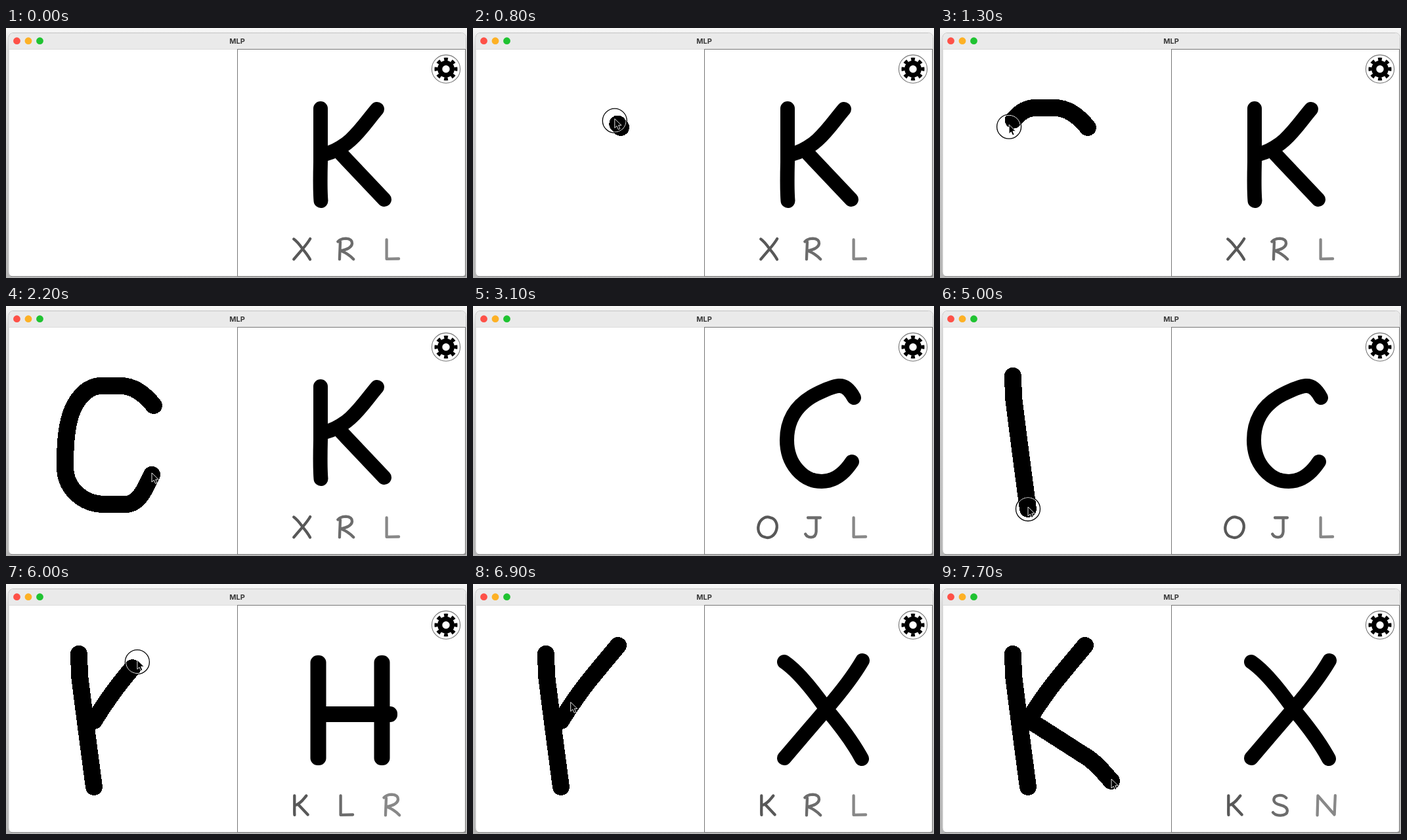
Write an HTML page that moves like this. It is 702 px wide and 382 px high and loops after 8000 ms.

```html
<!DOCTYPE html>
<html lang="en">
<head>
<meta charset="utf-8">
<title>MLP</title>
<style>
  html, body { margin: 0; width: 100%; height: 100%; overflow: hidden; }
  svg { display: block; width: 702px; height: 382px; }
  .title { font: 700 11px Inter, "Liberation Sans", sans-serif; fill: #3a3a3a; text-anchor: middle; }
  .round { fill: none; stroke-linecap: round; stroke-linejoin: round; }
  #ink { stroke-width: 26; shape-rendering: crispEdges; }
  #guess { stroke: #000; stroke-width: 22; }
</style>
</head>
<body>
<svg viewBox="0 0 702 382">
  <defs>
    <linearGradient id="desk" x2="0" y2="1">
      <stop offset="0" stop-color="#f8f8f8"/>
      <stop offset=".08" stop-color="#dedede"/>
      <stop offset="1" stop-color="#b4b4b4"/>
    </linearGradient>
  </defs>
  <rect width="702" height="382" fill="url(#desk)"/>
  <rect x="4" y="7.5" width="696.5" height="372.5" rx="7" fill="#fff" stroke="#c4c4c4"/>
  <path d="M4.5 32V15a7 7 0 0 1 7-7H693a7 7 0 0 1 7 7V32Z" fill="#eaeaea"/>
  <path d="M4.5 32.5H352" stroke="#dcdcdc"/>
  <circle cx="16.5" cy="19.7" r="5.4" fill="#fe5148"/>
  <circle cx="34" cy="19.7" r="5.4" fill="#fdb125"/>
  <circle cx="51.5" cy="19.7" r="5.4" fill="#1fc331"/>
  <text class="title" x="352" y="23.6">MLP</text>
  <path d="M7 379.5H353" stroke="#8c8c8c"/>
  <rect x="352.5" y="32.5" width="347" height="347" fill="none" stroke="#777"/>

  <g fill="none" stroke="#000" transform="translate(670 62.7)">
    <circle r="21.6" stroke="#777" stroke-width="1.1"/>
    <circle r="9.3" stroke-width="7.2"/>
    <circle r="15" stroke-width="5" pathLength="16" stroke-dasharray="1 1" stroke-dashoffset=".5"/>
  </g>

  <g id="guess" class="round"></g>
  <g id="ink" class="round"></g>
  <g id="pointer">
    <g id="brush" fill="none">
      <circle r="17.4" stroke="#fff"/>
      <circle r="18.5" stroke="#000" stroke-width="1.3"/>
    </g>
    <path d="M0 -3v14l3.200 -3 2.300 5.300 2.500 -1.100 -2.200 -5.200h4.500Z" fill="#000" stroke="#fff" stroke-width=".9"/>
  </g>
</svg>
<script>
const LOOP = 8000, STEP = 100;
const LAG = 40;   // ink trails the pointer
const HOLD = 90;  // pause before the pen lifts
const $ = id => document.getElementById(id);

// Letter skeletons at the size of the main guess, centred on (530, 193).
const glyphs = {
  K: 'M479 123V205Q478 245 479.5 264M565 124C545 147 525 183 485 193M510 192L576 262',
  C: 'M580 140Q570 121 557 122Q546 123 522 135Q478 158 478 205C478 242 503 268 531 268Q557 268 577 238',
  H: 'M474.5 120h2v146h-2zM571.5 120h2v146h-2zM475 198H585v2H475z',
  X: 'M474 119Q500 137 538 191Q575 235 592 267M593 117Q575 148 538 191L474 266',
  O: 'M542 123A60 74 15 1 1 504 265A60 74 15 1 1 542 123',
  J: 'M492 124H582M552 124V225Q550 266 515 266Q485 266 474 243',
  L: 'M490 123V264L578 262',
  R: 'M487 140L482 266M470 138Q490 115 528 115Q573 117 573 150Q570 190 490 204Q545 225 583 266',
  S: 'M574 140Q556 120 526 121Q484 124 484 155Q485 180 530 191Q582 203 582 234Q580 266 532 267Q492 267 478 246',
  N: 'M466 266L470 124L590 262L596 122'
};

// Main guess, then the three runners-up.
const guesses = [[0, 'KXRL'], [2300, 'COJL'], [5200, 'HKLR'], [6300, 'XKRL'], [7600, 'XKSN']];
const slots = [[450, '#585858'], [518, '#6c6c6c'], [588, '#888']];

// Pointer travel; a "pen" leg also leaves ink.
const legs = [
  { from: 300, to: 620, d: 'M168 190L225 152' },
  { from: 700, to: 2100, pen: true, gone: 3000,
    d: 'M225 152C212 136 196 122 175 122H145C122 122 103 145 96 175C91 195 90 215 90 245C90 280 118 303 150 303H182C204 303 213 275 222 258' },
  { from: 3400, to: 4400, d: 'M222 258L206 214L166 152L111 107' },
  { from: 4450, to: 4930, pen: true, d: 'M111 107L112 140Q120 205 134 310' },
  { from: 5200, to: 5480, d: 'M134 310V209' },
  { from: 5500, to: 6110, pen: true, d: 'M134 209Q157 172 178 146T221 94' },
  { from: 6250, to: 7060, d: 'M221 94Q172 165 128 203' },
  { from: 7080, to: 7450, pen: true, d: 'M128 203L215 259C238 272 247 286 261 301' }
];

$('ink').innerHTML = legs.map(l => `<path d="${l.d}" stroke="${l.pen ? '#000' : 'none'}"/>`).join('');
legs.forEach((leg, i) => {
  leg.path = $('ink').children[i];
  leg.length = leg.path.getTotalLength();
});

// Distance covered at time t; the pen gathers speed slightly.
function travelled({ from, to, pen, length }, t) {
  const k = Math.min(1, Math.max(0, (t - from) / (to - from)));
  return length * (pen ? k ** 1.3 : k);
}

function guessMarkup([main, ...rest]) {
  const small = rest.map((letter, i) => {
    const [x, color] = slots[i];
    return `<path d="${glyphs[letter]}" stroke="${color}" stroke-width="20.5"
      transform="translate(${x} 338) scale(.21) translate(-530 -193)"/>`;
  });
  return `<path d="${glyphs[main]}"/>` + small.join('');
}

const show = (el, on) => { el.style.display = on ? '' : 'none'; };
const latest = (list, test) => list.filter(test).pop();
let shownStep = -1, shownGuess = '';

function draw(t) {
  const letters = latest(guesses, g => g[0] <= t)[1];
  if (letters !== shownGuess) $('guess').innerHTML = guessMarkup(shownGuess = letters);

  for (const leg of legs) {
    show(leg.path, t >= leg.from && t < (leg.gone || LOOP));
    leg.path.setAttribute('stroke-dasharray', `${travelled(leg, t - LAG)} ${leg.length + 1}`);
  }

  const leg = latest(legs, l => l.from <= t) || legs[0];
  const { x, y } = leg.path.getPointAtLength(travelled(leg, t));
  $('pointer').setAttribute('transform', `translate(${x} ${y})`);
  show($('pointer'), t >= 300 && (t < 3000 || t >= 3600));
  show($('brush'), leg.pen && t < leg.to + HOLD);
}

const start = performance.now();
function tick() {
  const step = Math.floor((performance.now() - start) % LOOP / STEP);
  if (step !== shownStep) draw((shownStep = step) * STEP);
  requestAnimationFrame(tick);
}
tick();
</script>
</body>
</html>
```
